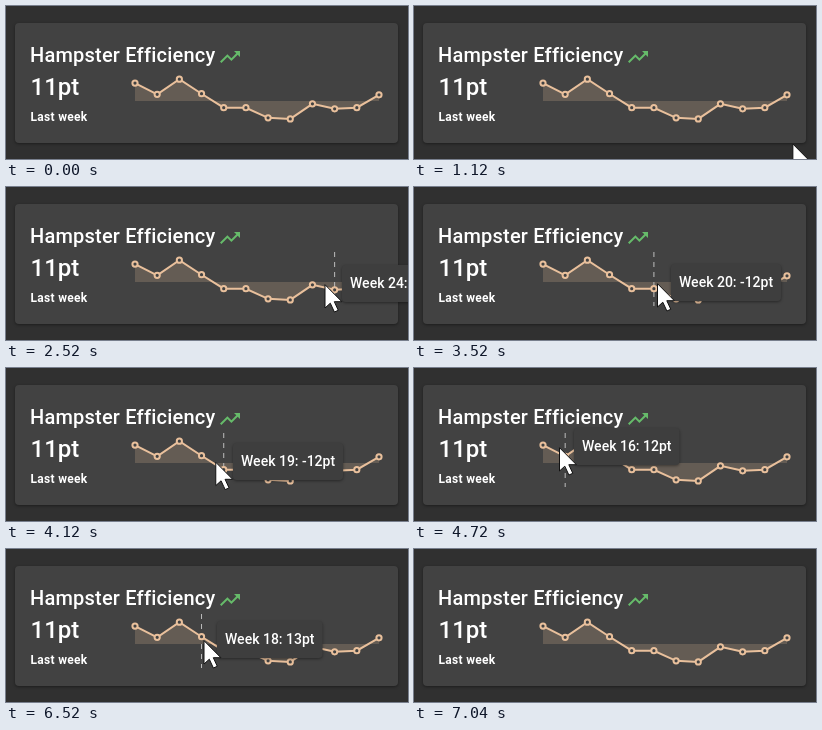
An HTML page with a canvas that plays this animation: 402 by 153 pixels, repeating every 8080 ms.

```html
<!DOCTYPE html>
<html lang="en">
<head>
<meta charset="utf-8">
<title>Efficiency card</title>
<style>
  html, body { margin: 0; width: 100%; height: 100%; overflow: hidden; background: #303030; }
  canvas { display: block; width: 402px; height: 153px; }
</style>
</head>
<body>
<canvas id="stage"></canvas>
<script>
const W = 402, H = 153, LOOP = 8080, STEP = 40;
const canvas = document.getElementById('stage');
const ctx = canvas.getContext('2d');
const ratio = window.devicePixelRatio || 1;
canvas.width = W * ratio;
canvas.height = H * ratio;

const SAND = '#e9c09c', CARD = '#424242';
const FIRST_WEEK = 15, LEFT = 129, GAP = 244 / 11, ZERO = 95, SCALE = 0.56;
const values = [32, 12, 39, 13, -12, -12, -30, -32, -5, -14, -12, 11];
const points = values.map((v, i) => ({ x: LEFT + i * GAP, y: ZERO - v * SCALE }));

const trend = new Path2D('M16 6l2.29 2.29-4.88 4.88-4-4L2 16.59 3.41 18l6-6 4 4 6.3-6.29L22 12V6z');
const arrow = new Path2D('M.5 .7V24L5.8 19.2L9.9 28L13.8 26.3L9.8 17.7H17.4Z');

// Pointer path: time, x, y
const path = [
  [960, 382, 153], [1440, 368, 92.5], [1600, 368, 92.5], [1800, 366, 92],
  [2400, 328, 96], [2520, 318.5, 97], [3200, 243, 96], [3520, 243, 96],
  [4320, 192, 92], [4720, 145, 79], [5160, 145, 79], [5480, 130, 83],
  [6120, 130, 83], [6360, 195, 90], [6480, 197, 91], [6520, 197.5, 91],
  [6800, 216, 113], [7040, 226, 157]
];
const SHOW = 1600, CHART_TOP = 65, CHART_BOTTOM = 119;

function slope(i, axis) {
  if (i <= 0 || i >= path.length - 1) return 0;
  const rate = k => (path[k + 1][axis] - path[k][axis]) / (path[k + 1][0] - path[k][0]);
  const a = rate(i - 1), b = rate(i);
  return a * b > 0 ? 2 * a * b / (a + b) : 0;
}

// Monotone cubic interpolation along the path
function pointer(t) {
  const last = path.length - 1;
  if (t < path[0][0] || t >= path[last][0]) return null;
  let i = 0;
  while (t >= path[i + 1][0]) i++;
  const span = path[i + 1][0] - path[i][0];
  const u = (t - path[i][0]) / span, u2 = u * u, u3 = u2 * u;
  const at = axis =>
    (2 * u3 - 3 * u2 + 1) * path[i][axis] + (3 * u2 - 2 * u3) * path[i + 1][axis] +
    span * ((u3 - 2 * u2 + u) * slope(i, axis) + (u3 - u2) * slope(i + 1, axis));
  return { x: at(1), y: at(2) };
}

function box(x, y, w, h, r, fill) {
  ctx.save();
  ctx.shadowColor = 'rgba(0,0,0,.4)';
  ctx.shadowBlur = 3 * ratio;
  ctx.shadowOffsetY = ratio;
  ctx.fillStyle = fill;
  ctx.beginPath();
  ctx.roundRect(x, y, w, h, r);
  ctx.fill();
  ctx.restore();
}

function label(text, x, y, font, spacing = 0) {
  ctx.font = font + ' Roboto, sans-serif';
  ctx.letterSpacing = spacing + 'px';
  ctx.fillStyle = '#fff';
  ctx.fillText(text, x, y);
  ctx.letterSpacing = '0px';
}

function drawCard() {
  box(9, 17, 383, 120, 4, CARD);
  label('Hampster Efficiency', 24, 56, '500 20px', 0.2);
  label('11pt', 24.5, 89, '500 24px');
  label('Last week', 24.5, 115, '700 12px', 0.3);
  ctx.save();
  ctx.translate(212, 39);
  ctx.fillStyle = '#66bb6a';
  ctx.fill(trend);
  ctx.restore();
}

function traceLine() {
  ctx.beginPath();
  points.forEach(p => ctx.lineTo(p.x, p.y));
}

function drawChart(active) {
  traceLine();
  ctx.lineTo(points[11].x, ZERO);
  ctx.lineTo(LEFT, ZERO);
  ctx.closePath();
  ctx.fillStyle = 'rgba(233,192,156,.2)';
  ctx.fill();

  if (active >= 0) {
    ctx.save();
    ctx.setLineDash([5, 5]);
    ctx.strokeStyle = '#bdbdbd';
    ctx.lineWidth = 1;
    ctx.beginPath();
    ctx.moveTo(points[active].x, CHART_TOP);
    ctx.lineTo(points[active].x, CHART_BOTTOM);
    ctx.stroke();
    ctx.restore();
  }

  ctx.strokeStyle = SAND;
  ctx.lineWidth = 2;
  traceLine();
  ctx.stroke();
  ctx.fillStyle = CARD;
  for (const p of points) {
    ctx.beginPath();
    ctx.arc(p.x, p.y, 2.6, 0, 2 * Math.PI);
    ctx.fill();
    ctx.stroke();
  }
}

function drawTip(at, active) {
  const text = `Week ${FIRST_WEEK + active}: ${values[active]}pt`;
  const x = Math.round(at.x) + 14, y = Math.round(at.y) - 19;
  ctx.font = '500 14px Roboto, sans-serif';
  box(x, y, ctx.measureText(text).width + 16, 37, 4, '#3e3e3e');
  label(text, x + 8, y + 23, '500 14px');
}

function drawPointer(at) {
  ctx.save();
  ctx.translate(at.x, at.y);
  ctx.fillStyle = '#fff';
  ctx.strokeStyle = '#111';
  ctx.lineWidth = 1;
  ctx.fill(arrow);
  ctx.stroke(arrow);
  ctx.restore();
}

function draw(now) {
  const t = Math.floor((now % LOOP) / STEP) * STEP;
  const mouse = pointer(t);
  // The tooltip trails the pointer by one step
  const hover = t >= SHOW ? pointer(t - STEP) : null;
  const inside = mouse && hover && hover.y < CHART_BOTTOM;
  const active = inside ? Math.max(0, Math.min(11, Math.round((hover.x - LEFT) / GAP))) : -1;

  ctx.setTransform(ratio, 0, 0, ratio, 0, 0);
  ctx.fillStyle = '#303030';
  ctx.fillRect(0, 0, W, H);
  drawCard();
  drawChart(active);
  if (inside) drawTip(hover, active);
  if (mouse) drawPointer(mouse);
}

function tick() {
  draw(performance.now());
  requestAnimationFrame(tick);
}
tick();
</script>
</body>
</html>
```
